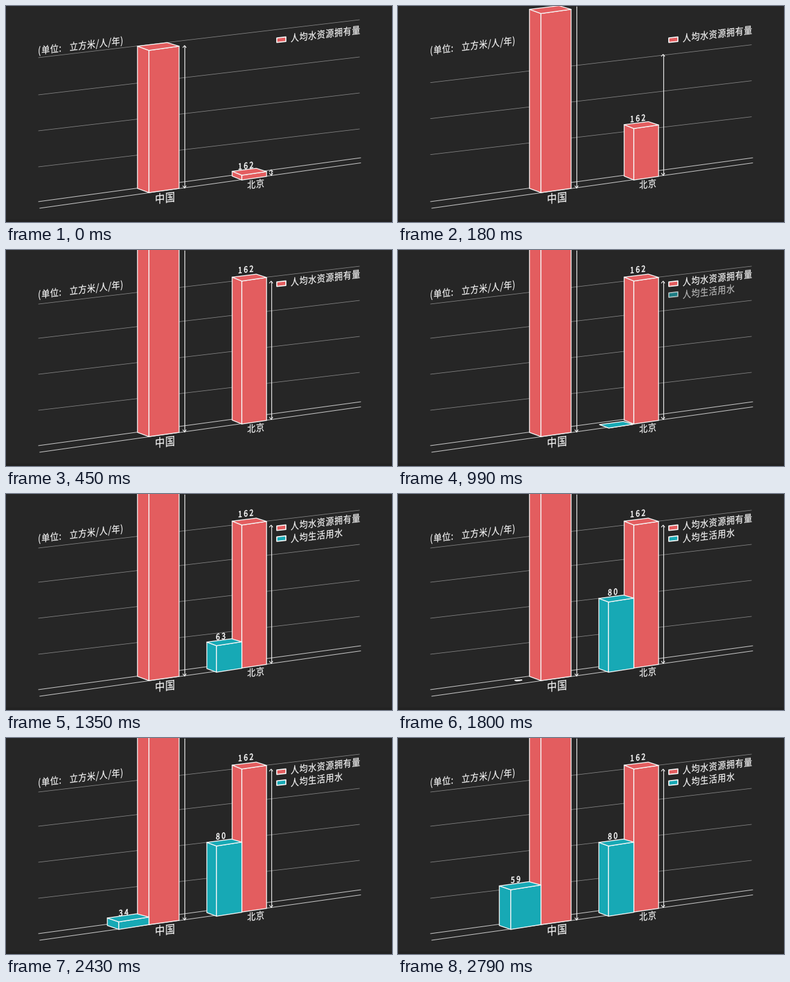
A matplotlib script that plays this animation: 640x360 px, repeating every 2970 ms.

```python
import numpy as np
import matplotlib.pyplot as plt
from matplotlib.animation import FuncAnimation
from matplotlib.patches import PathPatch, Polygon, Rectangle
from matplotlib.textpath import TextPath
from matplotlib.transforms import Affine2D

W, H, DPI = 640, 360, 80
FRAMES, INTERVAL = 33, 90
PX = 72 / DPI
BG, STRIP, RED, TEAL = "#262626", "#222222", "#e35d5f", "#17a9b5"
WHITE, GRID, FLOOR = "#f6f6f6", "#909090", "#d8d8d8"
SLOPE, SQUEEZE = 0.12, 0.84  # tilt and foreshortening of the chart plane
FONT = {"family": "Noto Sans CJK JP"}

fig = plt.figure(figsize=(W / DPI, H / DPI), dpi=DPI, facecolor=BG)
ax = fig.add_axes([0, 0, 1, 1])
ax.set_xlim(0, W)
ax.set_ylim(H, 0)
ax.axis("off")
live = []


def progress(f, start, length=5):
    return min(max((f - start) / length, 0), 1)


def smooth(p):
    return p * p * (3 - 2 * p)


def ease_out(p, power=3):
    return 1 - (1 - p) ** power


def poly(points, color, z, width=1.4, alpha=1):
    patch = Polygon(points, closed=True, fc=color, ec=WHITE, lw=width * PX,
                    joinstyle="round", zorder=z, alpha=alpha)
    return ax.add_patch(patch)


def line(xs, ys, color=WHITE, width=1.0, z=1):
    return ax.plot(xs, ys, color=color, lw=width * PX, zorder=z)[0]


def glyph(char, x, y, size, weight, alpha=1):
    plane = Affine2D(np.array([[SQUEEZE, 0, x],
                               [-SQUEEZE * SLOPE, -1, y],
                               [0, 0, 1]]))
    path = TextPath((0, 0), char, size=size, prop=FONT).transformed(plane)
    patch = PathPatch(path, fc=WHITE, ec=WHITE, lw=weight * PX,
                      zorder=5, alpha=alpha)
    return ax.add_patch(patch)


def text(s, x, y, size, alpha=1, tracking=0.8):
    """Set text along the tilted plane; Latin signs take a narrow cell."""
    glyphs, dx = [], 0
    for char in s:
        if char != " ":
            glyphs.append(glyph(char, x + dx, y - SLOPE * dx, size, 0.2, alpha))
        em = 1 if ord(char) > 255 else 0.37
        dx += em * size * SQUEEZE + tracking
    return glyphs


def number(value, cx, cy, size=14, step=9.4):
    digits = str(value)
    half = (step * (len(digits) - 1) + 0.555 * size * SQUEEZE) / 2
    for i, d in enumerate(digits):
        dx = i * step - half
        live.append(glyph(d, cx + dx, cy + 5 - SLOPE * dx, size, 0.6))


def box(base, height, color, z):
    """Draw a prism over the left, front and right corners of its base."""
    left, front, right = np.array(base, float)
    up = np.array([0, -height])
    back = left + right - front + [-1, 1]
    faces = [
        [left, front, front + up, left + up],
        [front, right, right + up, front + up],
        [left + up, front + up, right + up, back + up],
    ]
    live.extend(poly(face, color, z) for face in faces)


def arrow(x, top, bottom):
    live.append(line([x, x], [max(top, 1), bottom], width=1.2, z=2))
    for y, d in ((top, 3), (bottom, -3)):
        if y > 1:
            live.append(line([x - 2.6, x, x + 2.6], [y + d, y, y + d],
                             width=1.2, z=2))


CHINA = [(218, 304), (237, 311), (287, 304)]
BEIJING = [(375, 283.5), (391, 290), (432, 284)]
CHINA_USE = [(168, 312.5), (187, 319), (237, 311)]
BEIJING_USE = [(333, 291), (349, 297), (391, 290.5)]
OLD_ROWS = [86, 148, 208, 268]
NEW_ROWS = [328, 385, 445, 505]


def draw_grid(rise):
    for row in OLD_ROWS + NEW_ROWS:
        y = row - rise
        if 84 < y < 296:
            live.append(line([54, 586], [y, y - 63], GRID, 0.8))


def draw_supply(f):
    e = smooth(progress(f, 0.05))
    lead = ease_out(progress(f, 0), 4)
    draw_grid(238 * e)
    box(CHINA, 237 + 182 * e, RED, 2)
    arrow(296, 66 - 182 * lead, 303)
    height = 8 + 230.3 * e
    box(BEIJING, height, RED, 2)
    arrow(439.5, 273 - 221 * lead, 282)
    number(162, 397.5, 283.5 - height - 9.2 - 3.5 * e)


def draw_use(f, base, pivot, appear, grow, height, total, label_x):
    scale = ease_out(progress(f, appear))
    if scale == 0:
        return
    pivot = np.array(pivot)
    corners = pivot + (np.array(base) - pivot) * scale
    p = progress(f, grow)
    e = smooth(p)
    h = height * (0.04 + 0.96 * e) if p > 0 else 0
    box(corners, h, TEAL, 3)
    if p > 0:
        number(round(total * ease_out(p)), label_x,
               base[0][1] - h - 8.5 - 2 * e)


def swatch(y, color, alpha=1):
    return poly([(449, y), (464, y - 1.8), (464, y + 5.8), (449, y + 7.4)],
                color, 4, 1.8, alpha)


def draw_static():
    ax.add_patch(Rectangle((0, 356), W, 4, fc=STRIP, lw=0, zorder=0))
    line([54, 588], [326, 253], FLOOR)
    line([56, 588], [337, 261.5], FLOOR)
    text("(单位:  立方米/人/年)", 53, 80.5, 16.3)
    swatch(53.3, RED)
    text("人均水资源拥有量", 472, 59.5, 16.3)
    text("中国", 247, 329, 19.3)
    text("北京", 400, 304.5, 16.3)


def draw_legend(f):
    alpha = progress(f, 7.7)
    if alpha > 0:
        live.append(swatch(71.5, TEAL, alpha))
        live.extend(text("人均生活用水", 472, 80.5, 16.3, alpha))


def update(f):
    for artist in live:
        artist.remove()
    live.clear()
    draw_supply(f)
    draw_legend(f)
    draw_use(f, BEIJING_USE, (360, 290), 7.7, 13, 117, 80, 356)
    draw_use(f, CHINA_USE, (199, 310), 19.7, 25.75, 66, 59, 195)
    return live


draw_static()
anim = FuncAnimation(fig, update, frames=FRAMES, interval=INTERVAL,
                     repeat=True, blit=False)
plt.show()
```
